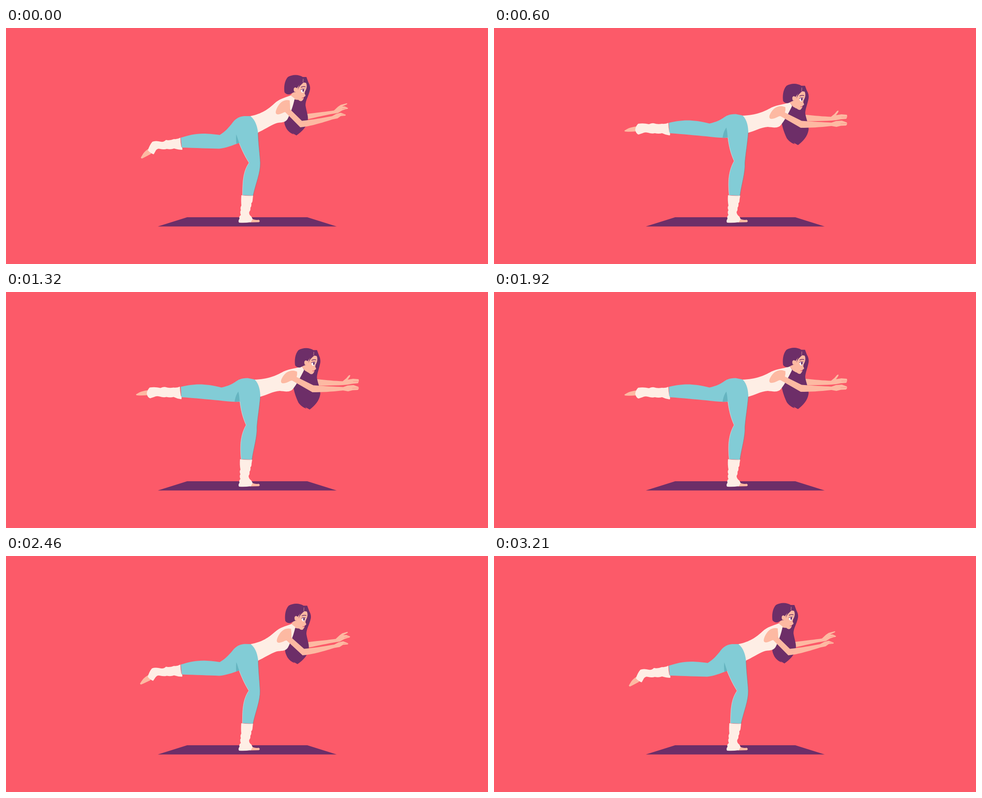
Recreate the animation shown at these times as an HTML page with a canvas. Size 1067 by 525 pixels, loop 3.24 s.

```html
<!DOCTYPE html>
<html lang="en">
<head>
<meta charset="utf-8">
<title>Balance pose</title>
<style>
  html, body { margin: 0; width: 100%; height: 100%; overflow: hidden; background: #fc5a69; }
  canvas { display: block; }
</style>
</head>
<body>
<canvas id="stage" width="1067" height="525"></canvas>
<script>
const ctx = document.getElementById('stage').getContext('2d');
const LOOP = 3240;
const BACKGROUND = '#fc5a69', PURPLE = '#6d2e68', TEAL = '#82ccd6', TEAL_SHADE = '#65b4c0';
const CREAM = '#feeee5', SKIN = '#fdb9a2', LINE = '#fc8880', LIGHT = '#ecd5d5', DARK = '#96646f';

// Each limb is a pair of outlines: upright lean and full stretch.
const backArm = [
  'M650 193L667 191C690 188 710 186 726 183.5L735 175L741 171L754 167.5Q757 168 754 170L744 174.5L750 174.5L757 178Q758 180 752 180.5L744 183.5L735 189L726 190.5C705 194 690 198 667 203L650 205Z',
  'M670 193L690 193C710 195 730 197 746 197.5L754 191L759 185L762 183.5Q764 185 760 190L757 194L769 192L781 193Q783 196 780 202L768 203L757 205L747 206C730 207 710 207.5 690 207L670 206Z'];
const frontArm = [
  'M628 161C614 157 604 168 599 180C595 190 598 193 604 192C610 191 615 187 618 187L651.5 221C670 219 690 214 722 203.5L734 201L741 196L751 195Q754 193 749 191.5L741 188.5L731 191L722 196C700 200 680 204 655 206.5L629 181Q629 170 628 161Z',
  'M645 176C630 170 618 178 612 190C607 199 610 203 616 202C624 201 629 196 634 196L679 222C700 222 720 221 747 218L758 220L768 217.5L779 217Q783 214.5 781 210L770 206L757 207L747 210.5C726 209.5 710 208.5 681 206.5L644 188Q646 182 645 176Z'];
const fingers = [
  'M744 180L752 178M742 193L750 193',
  'M769 198L782 198M767 213L782 212.5'];
const longHair = [
  'M655 110C668 114 675 128 673 137C670 152 663 160 663 172C665 186 670 196 668 207C665 220 656 230 643 239L634 234L637 237C630 234 625 230 621 224C617 216 615 211 617 205C626 190 630 175 632 160C640 140 650 120 655 110Z',
  'M678 129C692 133 698 146 696.5 156C694 170 689 180 689 190C691 202 697 215 696.5 226C694 242 684 252 673 260.5L663 255L666 258.5C658 256 652 251 648 245C642 232 639 222 637 212C648 195 655 185 656 175C664 158 672 140 678 129Z'];
const neck = [
  'M636 142L629 151L639 159L646 160L652 145Z',
  'M659 160L655 166L662 175L669 179L675 165Z'];
const torso = [
  'M630 150C615 156 606 157 594 168C580 181 566 191 541 196L557 233C570 227 585 217 598 212C608 209 617 212 623 203C630 190 636 172 639 157Z',
  'M654.5 165.5C638 171 630 170 614 177C598 186 580 194 550 195L563 233C578 229 590 221 606 220C618 221 628 224 635 216C643 206 654 186 660 173Z'];
const backLeg = [
  'M387 244C412 236 430 231.5 473 238C486 230 492 222 500 213L530 215L517 255C500 262 486 267 472 268.5C450 268 420 267 389 266',
  'M387 211C414 205 435 202 477 212.5C492 209 500 205 506 201L535 210L518 244C503 245 487 243 470 241C445 239 420 236 388 234'];
const legShade = [
  'M510 233C509 242 509 250 510 258L517 255Z',
  'M517 218C510 226 507 236 506 244.5L519 243Z'];
const frontLeg = [
  'M495 222C502 206 513 196 530 196L541 196C553 205 557 222 558 234C559 260 562 280 563 300C563.5 322 553 346 547 373L523.5 372C524 345 524 320 538 300C528 285 518 264 511 240C508 232 502 226 495 222Z',
  'M505 202C514 195 520 191.5 535 191.5L550 194.5C560 203 563 220 563 233C561 258 557 280 555.5 300C556.5 322 548 348 544.5 373L520.5 372C518 345 518 320 531.5 296C524 281 519 260 517 240C516 225 514 215 505 202Z'];
const legLight = [
  'M516 256C522 271 530 287 538 300C524 320 524 345 523.5 372',
  'M518 244C520 264 525 281 531.5 296C518 320 518 345 520.5 372'];
const legDark = [
  'M558 234C559 260 562 280 563 300C563.5 322 553 346 547 373',
  'M563 233C561 258 557 280 555.5 300C556.5 322 548 348 544.5 373'];
const backFoot = [
  'M318 267Q308 273 304 279L298.5 288Q299 291 302 290Q310 286 321 280Z',
  'M315 219Q302 221 296 224L289 228Q288 230 292 230.5Q302 231 315 230Z'];
const backWarmer = [
  'M386 244Q379 248 372 247Q362 251 354 249Q350 254 343 253Q331 250 324 253Q318 260 314 272Q320 279 327 281L332 272Q336 267 341 269Q350 271 356 269Q365 271 372 268Q382 271 390 271Q392 268 388 264Q386 253 386 244Z',
  'M386 211Q379 214 372 213Q362 215 354 212Q350 211 343 214Q331 211 319 213Q314 218 312.5 226Q314 235 320 237L329 234Q334 231 341 233Q350 236 356 234Q365 236 372 234Q380 238 389 239Q391 236 388 231Q386 220 386 211Z'];
const frontWarmer = [
  'M521 372Q534 374 547 373L546 382Q546 387 543 390Q544 396 541 400Q542 405 538.5 409Q537 415 543.5 420L546 425L542 432Q528 434 516 433Q513 430 517 424Q515 419 520 416Q517 410 520 405Q518 400 521 395Q520 385 521 372Z',
  'M518 372Q531 374 545 373L543.5 382Q544 387 541 390Q542 396 539 400Q540 405 537 409Q537 415 543.5 420L546 425L542 432Q528 434 516 433Q513 430 517 424Q515 419 519 416Q516 410 519 405Q516 400 519 395Q517 385 518 372Z'];

function morph([from, to], amountX, amountY = amountX) {
  const ends = to.match(/[\d.]+/g);
  let i = 0;
  return from.replace(/[\d.]+/g, n => {
    const amount = i % 2 ? amountY : amountX;
    return (+n + (ends[i++] - n) * amount).toFixed(2) + ' ';
  });
}

function fill(path, color) {
  ctx.fillStyle = color;
  ctx.fill(new Path2D(path));
}

function stroke(path, color, width = 1) {
  ctx.strokeStyle = color;
  ctx.lineWidth = width;
  ctx.stroke(new Path2D(path));
}

// Progress through the hold in the stretched pose.
function settle(t) {
  return t > 600 && t < 1920 ? Math.sin(Math.PI * (t - 600) / 1320) : 0;
}

// Stretch forward, hold, then return with a long ease-out.
function stretch(t, returnTime, power) {
  if (t < 600) return (1 - Math.cos(Math.PI * t / 600)) / 2;
  if (t < 1920) return 1;
  const x = Math.min(1, (t - 1920) / returnTime);
  return (1 - x ** power) ** 3;
}

function shifted(x, y, paint) {
  ctx.save();
  ctx.translate(x, y);
  paint();
  ctx.restore();
}

function drawHead(eyesClosed) {
  fill('M616.5 143C615 132 616 118 624 109C634 103 648 103 657 109L665 109L672 128L660 126L645 140L635 144L628 147.5Q621 149 616.5 143Z', PURPLE);
  fill('M657 121C649 126 646 131 644 134C640 130 636 133 637 138C637 142 640 143 641 142L640 155L650 162Q655 164 657 160L659 157L659 154L663 151Q663 149 661 146L662 141C666 135 667 127 664 122Z', SKIN);
  fill('M662 117C652 121 647 128 646 138C648 131 652 127 658 122Z', PURPLE);
  stroke('M658 113L657.5 121', SKIN, 0.7);
  stroke('M653 132Q658 129 663 131', PURPLE, 1.5);
  if (eyesClosed) {
    stroke('M652 139Q653 145 658 145', PURPLE, 1.3);
  } else {
    fill('M653 137Q657 134 661 136Q661 143 656 144Q652 142 653 137Z', '#fff');
    fill('M656.5 136.5Q660 135 660 139Q659 143 657 142Q655.5 139 656.5 136.5Z', PURPLE);
    stroke('M652.5 137.5Q656 134.5 661.5 136', PURPLE, 1.2);
  }
  stroke('M655 155.5L659 155.5', '#d94860', 1.2);
}

function draw(t) {
  const body = stretch(t, 800, 1.4);
  const reach = stretch(t, 1100, 1.2);
  const rest = settle(t);
  const part = (shape, color) => fill(morph(shape, body), color);
  const limb = (shape, color) => fill(morph(shape, reach, body), color);

  fill('M0 0H1067V525H0Z', BACKGROUND);
  fill('M401 421H667L732 441.5H336Z', PURPLE);
  shifted(-0.7 * rest, rest, () => {
    limb(backArm, SKIN);
    part(longHair, PURPLE);
  });
  part(neck, SKIN);
  part(torso, CREAM);
  shifted(-rest, -rest / 2, () => limb(backFoot, SKIN));
  part(backLeg, TEAL);
  part(legShade, TEAL_SHADE);
  shifted(-rest, -rest / 2, () => limb(backWarmer, CREAM));
  part(frontLeg, TEAL);
  stroke(morph(legLight, body), LIGHT, 0.8);
  stroke(morph(legDark, body), DARK, 0.7);
  fill('M540 428L546 425Q553 428 559 426.5Q564 429 560 432L540 432.5Z', SKIN);
  part(frontWarmer, CREAM);
  shifted(23.5 * body, 19.5 * body + 0.7 * rest, () => drawHead(t >= 150 && t < 360));
  shifted(-0.7 * rest, rest, () => {
    limb(frontArm, SKIN);
    stroke(morph(fingers, reach, body), LINE, 0.8);
  });
}

function tick() {
  draw(performance.now() % LOOP);
  requestAnimationFrame(tick);
}
tick();
</script>
</body>
</html>
```
